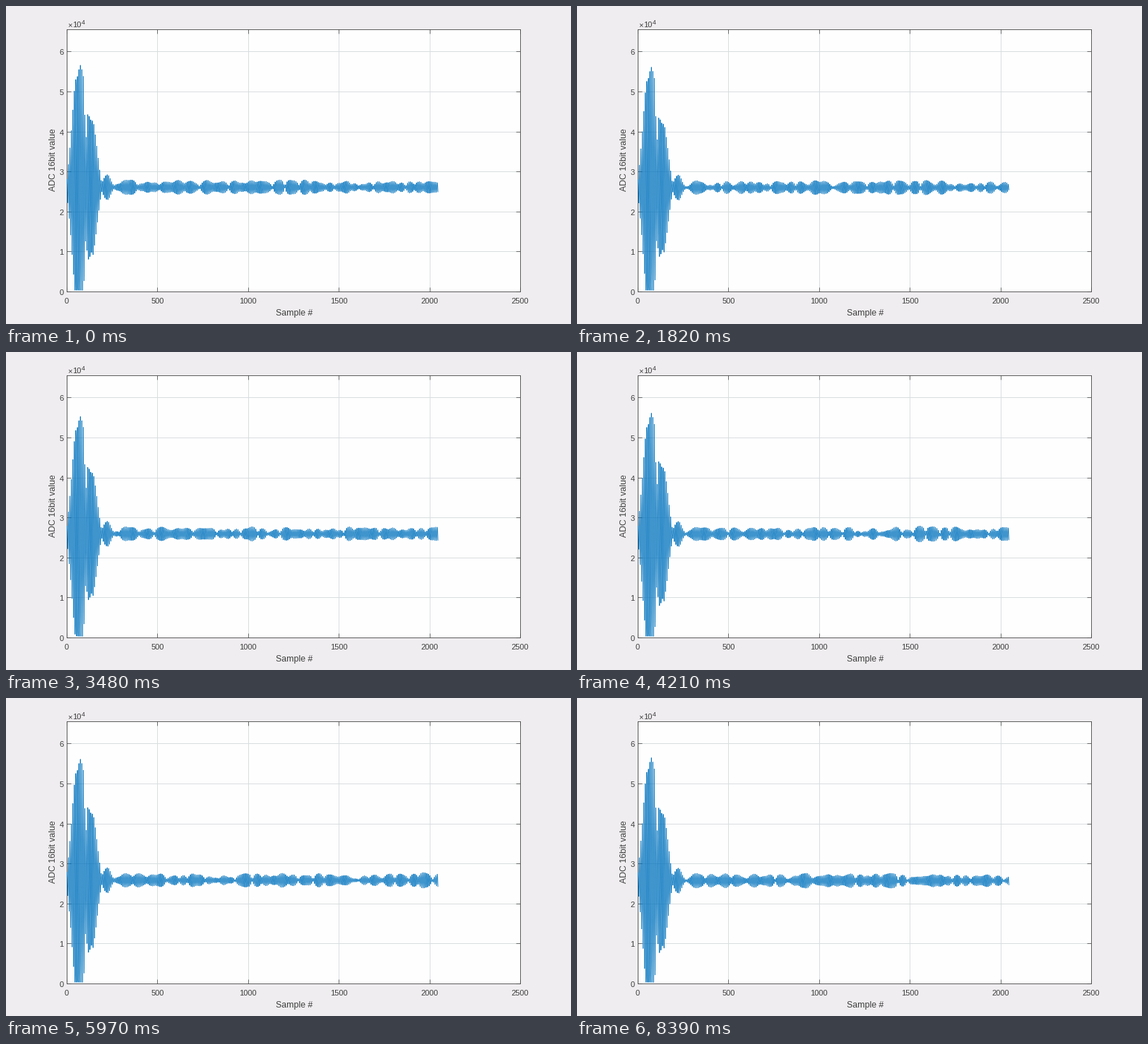
A matplotlib script that plays this animation: 800 by 450 pixels, repeating every 8420 ms.

```python
import numpy as np
import matplotlib.pyplot as plt
from matplotlib.animation import FuncAnimation

W, H, DPI = 800, 450, 100
LOOP_MS, FRAMES = 8420, 278
SAMPLES, PERIOD = 2048, 8.2
LEFT, TOP, WIDE, HIGH = 86, 33, 642, 371
INK, EDGE, BLUE = "#262626", "#4c4c4c", "#0072bd"

plt.rcParams["font.family"] = "Liberation Sans"
plt.rcParams["path.simplify"] = False

s = np.arange(SAMPLES)
carrier = np.cos(2 * np.pi * (s - 75) / PERIOD)

# Transmit pulse: steep rise, flat top, shoulder, ring-down.
rise = np.interp(s, [0, 25, 48, 75, 92, 115], [.05, .45, .92, 1, .95, 0])
shoulder = np.interp(s, [92, 115, 145, 195], [0, 1, .95, 0])
hump = np.exp(-((s - 222) / 27) ** 2)

# Echoes: drifting waves interfere, which makes lobes and nulls.
WAVES = 12
rng = np.random.default_rng(7)
wave_k = rng.uniform(-.08, .08, WAVES)
wave_w = rng.uniform(-.06, .06, WAVES)
wave_p = rng.uniform(0, 2 * np.pi, WAVES)
ripples = np.exp(1j * (np.outer(wave_k, s) + wave_p[:, None])) / np.sqrt(WAVES)
near = np.exp(-((s - 325) / 42) ** 2)
fade_in = np.clip((s - 245) / 60, 0, 1)


def echoes(i):
    field = np.exp(1j * wave_w * i) @ ripples
    size = np.abs(field * (1 - .7 * near) + 1.7 * near)
    return fade_in * (120 + 2000 * np.tanh(size / 1.5))


def trace(i):
    weak = np.exp(-((i - 91) / 25) ** 2)
    jitter = 1 + .008 * np.sin(1.3 * i)
    pulse = np.maximum((30500 - 2500 * weak) * jitter * rise,
                       (18200 - 3600 * weak) * shoulder)
    env = np.maximum.reduce([pulse, 3300 * hump, echoes(i)])
    base = 26050 - 1.3 * i
    return np.clip(base + env * carrier, 300, 65535)


def pt(px):
    return px * 72 / DPI


def label(x, y, text, px=11.1, **kw):
    """Text with its baseline anchored at stage pixel (x, y)."""
    fig.text(x / W, 1 - y / H, text, fontsize=pt(px), color=INK, alpha=.88,
             va="baseline", rotation_mode="anchor", **kw)


fig = plt.figure(figsize=(W / DPI, H / DPI), dpi=DPI, facecolor="#efedef")
ax = fig.add_axes([LEFT / W, 1 - (TOP + HIGH) / H, WIDE / W, HIGH / H],
                  facecolor="#fefefe")
ax.set(xlim=(0, 2500), ylim=(0, 65535),
       xticks=range(0, 2501, 500), yticks=range(0, 60001, 10000))
ax.tick_params(direction="in", length=pt(6), width=pt(.8), color=EDGE,
               top=True, right=True, labelbottom=False, labelleft=False)
ax.grid(color="#d9dddf", linewidth=pt(1))
ax.set_axisbelow(True)
for spine in ax.spines.values():
    spine.set(linewidth=pt(.9), color=EDGE)

for n in range(6):
    label(LEFT + WIDE * n / 5, 421, str(500 * n), ha="center")
for n in range(7):
    label(81.5, 409 - HIGH * n / 6.5535, str(n), ha="right")
label(87, 30.4, "×", ha="left")
label(94, 30.4, "10", ha="left")
label(107, 26, "4", 9, ha="left")
label(408, 437.6, "Sample #", 12.3, ha="center")
label(69.6, 218, "ADC 16bit value", 12.3, ha="center", rotation=90)

line, = ax.plot(s, trace(0), color=BLUE, linewidth=pt(.8), zorder=3)


def update(i):
    line.set_ydata(trace(i))
    return line,


anim = FuncAnimation(fig, update, frames=FRAMES, interval=LOOP_MS / FRAMES,
                     repeat=True, repeat_delay=0)
plt.show()
```
